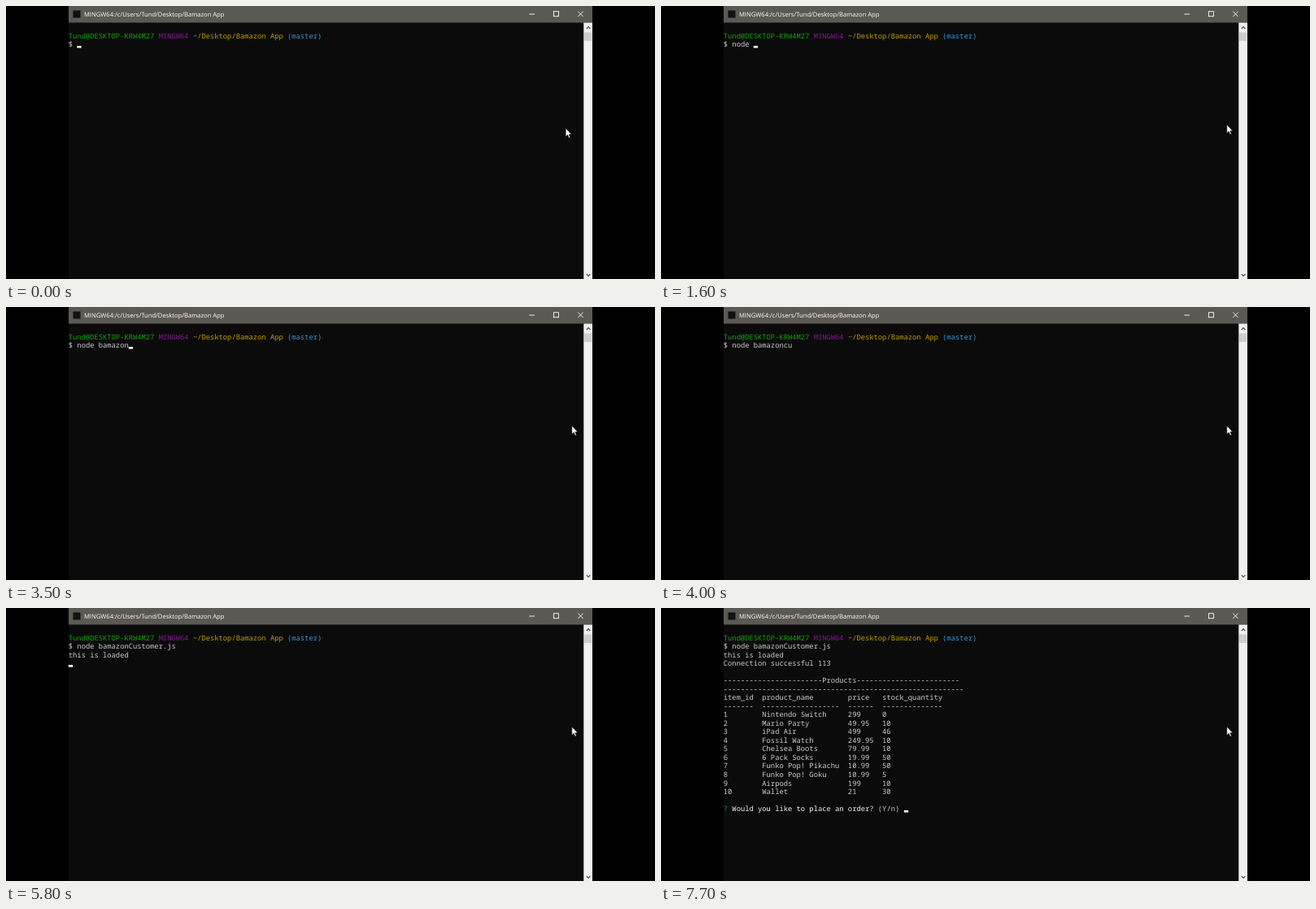
Animation, 798 px wide and 336 px high, one loop 8000 ms. Source, as an HTML page:

```html
<!DOCTYPE html>
<html lang="en">
<head>
<meta charset="utf-8">
<title>Terminal session</title>
<style>
  html, body { margin: 0; width: 798px; height: 336px; overflow: hidden; background: #000; }
  svg { display: block; }
  text { white-space: pre; text-rendering: geometricPrecision; }
  #screen text { font: 8.81px "Noto Sans Mono", "DejaVu Sans Mono", monospace; fill: #ccc; }
  #title { font: 7.62px "Open Sans", "Noto Sans", sans-serif; fill: #fff; }
  #screen .user { fill: #13a10e; }
  #screen .system { fill: #881798; }
  #screen .path { fill: #c19c00; }
  #screen .branch { fill: #3a96dd; }
  #screen .ask { fill: #f2f2f2; }
</style>
</head>
<body>
<svg width="798" height="336" viewBox="0 0 798 336">
  <rect width="798" height="336" fill="#000"/>
  <rect x="77" width="644" height="336" fill="#0b0b0b"/>
  <rect x="77" width="644" height="20.5" fill="#5a5954"/>
  <rect x="82.5" y="5.5" width="9" height="9" fill="#111"/>
  <text id="title" x="96" y="12.7">MINGW64:/c/Users/Tund/Desktop/Bamazon App</text>
  <g fill="none" stroke="#fff" stroke-width=".9">
    <path d="M643.3 10H650"/>
    <rect x="673.4" y="6.7" width="6" height="6"/>
    <path d="M703.3 6.6l6.4 6.4m0 -6.4l-6.4 6.4"/>
  </g>
  <rect x="710.3" y="20.5" width="10.7" height="315.5" fill="#f0f0f0"/>
  <rect x="711" y="32.5" width="9.5" height="10.5" fill="#cdcdcd"/>
  <g fill="none" stroke="#505050" stroke-width="1.2">
    <path d="M713.8 28l2.3 -2.3l2.3 2.3"/>
    <path d="M713.8 330l2.3 2.3l2.3 -2.3"/>
  </g>
  <g id="screen"></g>
  <rect id="caret" width="5.3" height="2.6" fill="#fff"/>
  <path id="mouse" d="M0 0V10.2L2.4 8L4 11.8L5.6 11.1L4 7.4H7.2Z" fill="#fff" stroke="#000" stroke-width=".5"/>
</svg>
<script>
const LOOP = 8000, LEFT = 76.8, COL = 5.286, ROW = 10.525;
const $ = id => document.getElementById(id);
const dash = n => "-".repeat(n);
const tableRow = (id, name, price, stock) =>
  id.padEnd(9) + name.padEnd(20) + price.padEnd(8) + stock;

const products = `Nintendo Switch,299,0
Mario Party,49.95,10
iPad Air,499,46
Fossil Watch,249.95,10
Chelsea Boots,79.99,10
6 Pack Socks,19.99,50
Funko Pop! Pikachu,10.99,50
Funko Pop! Goku,10.99,5
Airpods,199,10
Wallet,21,30`.split("\n").map((line, i) => tableRow(String(i + 1), ...line.split(",")));

const report = [
  "Connection successful 113",
  "",
  dash(23) + "Products" + dash(24),
  dash(56),
  tableRow("item_id", "product_name", "price", "stock_quantity"),
  tableRow(dash(7), dash(18), dash(6), dash(14)),
  ...products
];

// A line is a list of [text, class] runs.
function addLine(row, ...runs) {
  const line = document.createElementNS("http://www.w3.org/2000/svg", "text");
  line.setAttribute("x", LEFT);
  line.setAttribute("y", 39.6 + row * ROW);
  for (const [str, cls] of runs) {
    const span = document.createElementNS("http://www.w3.org/2000/svg", "tspan");
    span.textContent = str;
    if (cls) span.setAttribute("class", cls);
    line.append(span);
  }
  $("screen").append(line);
  return line;
}

addLine(0, ["Tund@DESKTOP-KRW4M27 ", "user"], ["MINGW64 ", "system"],
  ["~/Desktop/Bamazon App ", "path"], ["(master)", "branch"]);
const command = addLine(1, ["$ "]);
const loaded = addLine(2, ["this is loaded"]);
const results = report.map((str, i) => addLine(i + 3, [str]));
results.push(addLine(20, ["? ", "user"], ["Would you like to place an order? ", "ask"], ["(Y/n)"]));

// Start time and command text
const typing = [
  [0, ""], [1000, "n"], [1200, "no"], [1300, "nod"], [1500, "node"], [1600, "node "],
  [1700, "node b"], [1800, "node ba"], [2400, "node bam"], [2700, "node bamazon"],
  [3600, "node bamazonc"], [3800, "node bamazoncu"], [4300, "node bamazonCustomer.js "]
];
// Start time and caret visibility
const blink = [
  [0, 1], [300, 0], [800, 1], [1400, 0], [1500, 1], [1900, 0], [2400, 1], [2900, 0],
  [3500, 1], [4000, 0], [4300, 1], [4500, 0], [5000, 1], [5600, 0], [5800, 1],
  [6100, 0], [6600, 1], [7200, 0], [7700, 1]
];
// Start time, caret column and row once the command runs
const output = [[5300, 0, 2], [5800, 0, 3], [5900, 42, 20]];
// Start time and pointer tip
const pointer = [[0, 688.2, 150.6], [100, 691, 149.1], [200, 694, 147.6], [300, 695.8, 146.3]];

const at = (steps, t) => steps.findLast(step => step[0] <= t);
const show = (el, on) => el.setAttribute("visibility", on ? "visible" : "hidden");

function draw(t) {
  const typed = at(typing, t)[1];
  const [, col, row] = at(output, t) || [0, 2 + typed.length, 1];
  const [, x, y] = at(pointer, t);
  const str = "$ " + typed;
  if (command.textContent !== str) command.firstChild.textContent = str;
  show(loaded, t >= 5800);
  results.forEach(line => show(line, t >= 5900));
  $("caret").setAttribute("x", LEFT + col * COL);
  $("caret").setAttribute("y", 49 + (row - 1) * ROW);
  show($("caret"), at(blink, t)[1]);
  $("mouse").setAttribute("transform", `translate(${x} ${y})`);
}

const start = performance.now();
function tick() {
  draw((performance.now() - start) % LOOP);
  requestAnimationFrame(tick);
}
tick();
</script>
</body>
</html>
```
